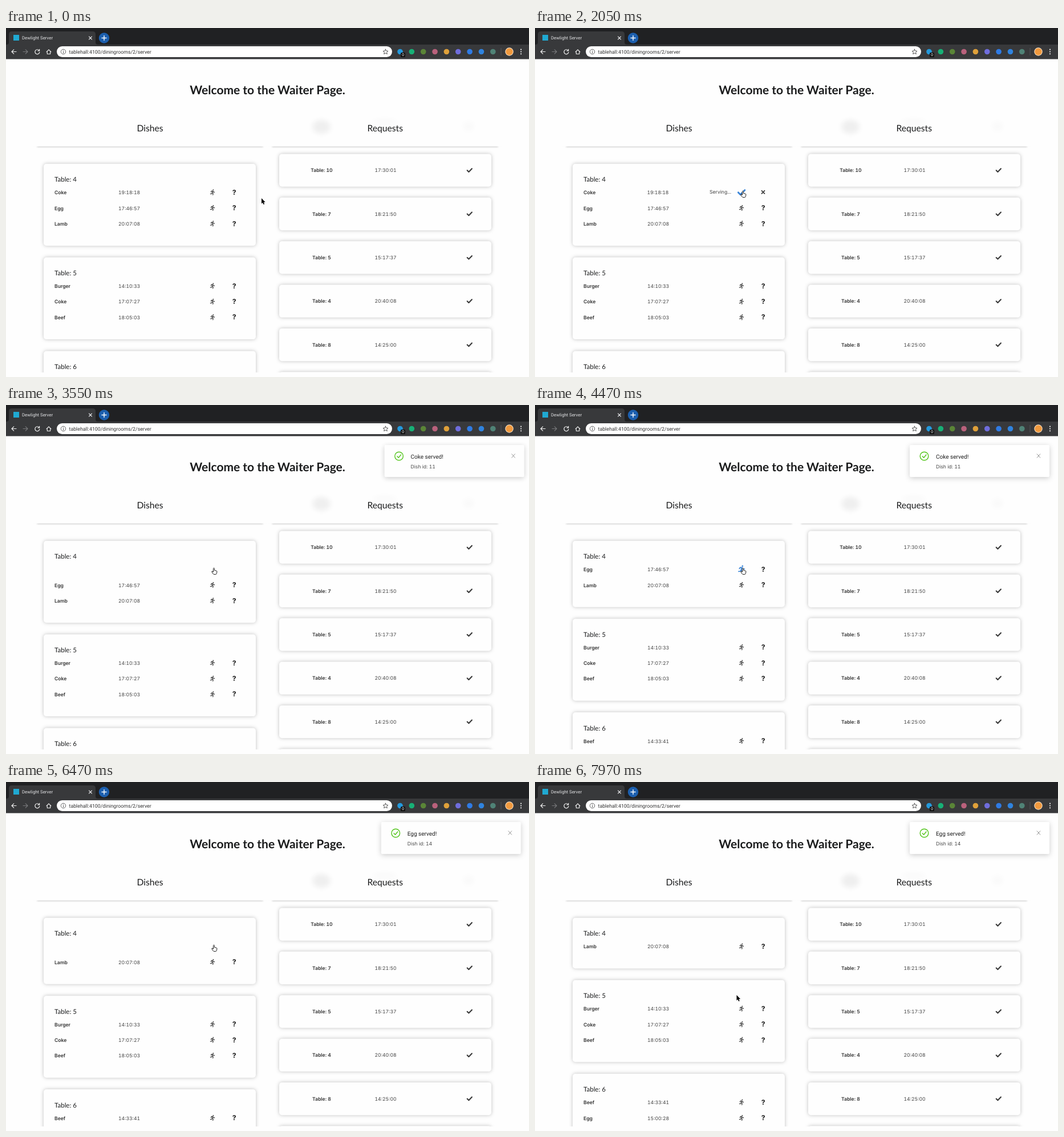
Animation, 917 px wide and 611 px high, one loop 8 s. Source, as an HTML page:

```html
<!DOCTYPE html>
<html lang="en">
<head>
<meta charset="utf-8">
<title>Waiter page</title>
<style>
  html, body { margin: 0; width: 100%; height: 100%; overflow: hidden; background: #fefefe; }
  svg { display: block; width: 917px; height: 611px; text-rendering: geometricPrecision; }
  text { font: 400 8.6px Inter, sans-serif; font-variant-numeric: tabular-nums; fill: #444; }
  .name { font-weight: 600; fill: #333; }
  .mark { font-weight: 800; font-size: 12px; fill: #333; text-anchor: middle; }
  .h1, .h2, .h3 { font-family: Lato, sans-serif; fill: #1b1c1d; }
  .h1 { font-size: 21px; font-weight: 700; text-anchor: middle; }
  .h2 { font-size: 15.7px; text-anchor: middle; }
  .h3 { font-size: 11.5px; }
  .chrome { font: 400 8.8px Roboto, sans-serif; fill: #333; }
  .tab { font-size: 7.8px; fill: #e2e3e5; }
  .note { font: 400 10px Roboto, sans-serif; fill: #1c1c1c; }
  .tip { font-size: 8.3px; fill: #fff; text-anchor: middle; }
  .mid { text-anchor: middle; }
  .card { fill: #fefefe; filter: drop-shadow(0 0 3px rgba(0,0,0,.25)); }
  .line { fill: none; stroke-linecap: round; stroke-linejoin: round; }
</style>
</head>
<body>
<script>
const LOOP = 8000, ROW = 27.4, DARK = [58, 58, 58], BLUE = [58, 133, 216];
const RUN = 'M.6-2L-.6 .9M.6-2L2-.2H3.6M.6-2L-1.6-2.2L-2.6-.6M-.6 .9L1.2 2L.7 4.6M-.6 .9L-1.4 2.6L-3.6 2.8';
const CHECK = 'M-4 .3L-1.3 3L4.2-2.7';
const CROSS = 'M-2.5-2.5L2.5 2.5M2.5-2.5L-2.5 2.5';

function el(parent, tag, attrs = {}) {
  const node = document.createElementNS('http://www.w3.org/2000/svg', tag);
  set(node, attrs);
  return parent.appendChild(node);
}
function set(node, attrs) {
  for (const key in attrs) node.setAttribute(key, attrs[key]);
}
const group = (p, x = 0, y = 0) => el(p, 'g', { transform: `translate(${x} ${y})` });
const rect = (p, x, y, width, height, fill, rx = 0) => el(p, 'rect', { x, y, width, height, fill, rx });
const circle = (p, cx, cy, r, fill) => el(p, 'circle', { cx, cy, r, fill });
const line = (p, d, stroke, width) => el(p, 'path', { d, stroke, 'stroke-width': width, class: 'line' });
function text(p, x, y, str, cls = '') {
  const node = el(p, 'text', { x, y, class: cls });
  node.textContent = str;
  return node;
}
const move = (node, x, y, s = 1) => node.setAttribute('transform', `translate(${x} ${y}) scale(${s})`);
const show = (node, on) => node.setAttribute('opacity', +on);

const clamp = v => Math.min(1, Math.max(0, v));
const span = (t, from, to) => clamp((t - from) / (to - from));
const easeOut = p => 1 - (1 - p) ** 3;
const easeBoth = p => p < .5 ? 4 * p ** 3 : 1 - 4 * (1 - p) ** 3;
const tint = p => `rgb(${DARK.map((c, i) => Math.round(c + (BLUE[i] - c) * p))})`;

const svg = el(document.body, 'svg', { viewBox: '0 0 917 611' });
const defs = el(svg, 'defs');
rect(el(defs, 'clipPath', { id: 'list' }), 0, 150, 917, 453);
for (const [id, size] of [['soft', 1.6], ['haze', 5]]) {
  const filter = el(defs, 'filter', { id, x: '-50%', y: '-300%', width: '200%', height: '700%' });
  el(filter, 'feGaussianBlur', { stdDeviation: size });
}

function browser() {
  rect(svg, 0, 0, 917, 30, '#202123');
  el(svg, 'path', { d: 'M1 29Q5 29 5 25V11Q5 6 10 6H152Q157 6 157 11V25Q157 29 161 29Z', fill: '#38393b' });
  rect(svg, 0, 29, 917, 25.5, '#38393b');
  rect(svg, 13, 12, 10, 10, '#20a9d2');
  text(svg, 28, 20.2, 'Dewlight Server', 'chrome tab');
  line(group(svg, 148, 17.5), CROSS, '#e2e3e5', 1.1);
  circle(svg, 172, 17.5, 9.2, '#1c5fae');
  line(svg, 'M168 17.5H176M172 13.5V21.5', '#fff', 1.4);

  line(svg, 'M18 41.5H10M13.7 37.8L10 41.5L13.7 45.2', '#f1f1f1', 1.2);
  line(svg, 'M30 41.5H38M34.3 37.8L38 41.5L34.3 45.2', '#77787a', 1.2);
  line(svg, 'M58 39.3A4 4 0 1 0 58.8 42.4M58.6 37.3V40H55.8', '#f1f1f1', 1.2);
  line(svg, 'M71 41.8L75 38L79 41.8M72.3 41.2V45.5H77.7V41.2', '#f1f1f1', 1.1);
  rect(svg, 89, 32, 588, 19, '#fff', 9.5);
  set(circle(svg, 100.5, 41.5, 4.2, 'none'), { stroke: '#555', 'stroke-width': .9 });
  line(svg, 'M100.5 41.2V43.6M100.5 39.4V39.5', '#555', 1);
  text(svg, 110.5, 44.7, 'tablehall:4100/diningrooms/2/server', 'chrome');
  line(svg, 'M665.5 37.2L666.8 40.1L670 40.4L667.6 42.5L668.3 45.6L665.5 44L662.7 45.6L663.4 42.5L661 40.4L664.2 40.1Z', '#444', .9);

  ['#2499dc', '#17b076', '#5a8537', '#b9617c', '#dfa03a', '#6f6ddc', '#2f7be4', '#2f83df', '#4f8276']
    .forEach((color, i) => circle(svg, 691 + i * 20.35, 41.5, 4.8, color));
  rect(svg, 692, 43, 8, 8, '#111', 1.5);
  set(text(svg, 696, 49.4, '0', 'mid'), { style: 'font-size:6.5px;fill:#fff' });
  rect(svg, 867.5, 35, 1, 13, '#55565a');
  circle(svg, 882.5, 41.5, 7.2, '#fbe9d2');
  circle(svg, 882.5, 41.5, 6.2, '#f0993e');
  for (const y of [37.7, 41.5, 45.3]) circle(svg, 903, y, 1.1, '#f1f1f1');
}

function header(x, title) {
  set(rect(svg, x + 4, 205, 396, 3, '#000'), { opacity: .3, filter: 'url(#soft)' });
  rect(svg, x - 4, 196, 412, 11.5, '#fefefe');
  text(svg, x + 202, 181, title, 'h2');
}

function dishRow(card, i, [name, time]) {
  const g = group(card, 0, 50.3 + i * ROW);
  const row = { g };
  text(g, 85, 3.1, name, 'name');
  row.time = text(g, 197, 3.1, time);
  row.ring = rect(g, 337, -14.5, 50, 29, 'none', 1.5);
  set(row.ring, { stroke: '#5a9cf0', 'stroke-width': 2.6, opacity: 0 });
  row.run = group(g, 362, -.5);
  row.legs = line(row.run, RUN, tint(0), 1.25);
  row.head = circle(row.run, 1.3, -3.9, 1, tint(0));
  row.ask = text(g, 400.3, 3.7, '?', 'mark');
  row.serving = group(g);
  text(row.serving, 306, 2.3, 'Serving...');
  row.check = group(row.serving, 362, -.5);
  row.tick = line(row.check, CHECK, tint(0), 2.1);
  line(group(row.serving, 400, -.7), CROSS, '#3a3a3a', 1.8);
  show(row.serving, false);
  return row;
}

function dishCard(list, top, table, dishes) {
  const g = group(list, 0, top);
  const box = rect(g, 66, 0, 372, 61.3 + 3 * ROW, '#fefefe', 5);
  box.setAttribute('class', 'card');
  text(g, 85, 31.5, 'Table: ' + table, 'h3');
  return { g, top, box, rows: dishes.map((d, i) => dishRow(g, i, d)) };
}

function notice(title, detail) {
  const g = group(svg);
  set(rect(g, 657, 70, 245, 56, '#fff', 2), { style: 'filter:drop-shadow(0 2.5px 5px rgba(0,0,0,.2))' });
  line(g, 'M689.8 89.5A7.3 7.3 0 1 1 675.2 89.5A7.3 7.3 0 1 1 689.8 89.5M679.3 89.8L681.7 92.2L686 87', '#52c41a', 1.4);
  text(g, 703, 93.6, title, 'note');
  text(g, 703, 111.2, detail);
  line(group(g, 883, 89), 'M-2.8-3.2L2.8 3.2M2.8-3.2L-2.8 3.2', '#888', .9);
  return g;
}

browser();
for (const [x, y, rx, ry, o] of [[553, 173, 16, 12, .06], [664, 164, 22, 6, .015], [811, 172, 10, 9, .015]])
  el(svg, 'ellipse', { cx: x, cy: y, rx, ry, opacity: o, filter: 'url(#haze)' });
text(svg, 458.5, 116, 'Welcome to the Waiter Page.', 'h1');
header(50.5, 'Dishes');
header(462.7, 'Requests');

const list = el(svg, 'g', { 'clip-path': 'url(#list)' });
const cards = [
  [4, [['Coke', '19:18:18'], ['Egg', '17:46:57'], ['Lamb', '20:07:08']]],
  [5, [['Burger', '14:10:33'], ['Coke', '17:07:27'], ['Beef', '18:05:03']]],
  [6, [['Beef', '14:33:41'], ['Egg', '15:00:28']]]
].map(([table, dishes], i) => dishCard(list, 237.7 + i * 163.9, table, dishes));

[[10, '17:30:01'], [7, '18:21:50'], [5, '15:17:37'], [4, '20:40:08'], [8, '14:25:00'], [9, '16:12:45']]
  .forEach(([table, time], i) => {
    const g = group(list, 0, 220.5 + i * 76.35);
    rect(g, 479, 0, 372, 57.3, '#fefefe', 5).setAttribute('class', 'card');
    text(g, 553.4, 31.8, 'Table: ' + table, 'name mid');
    text(g, 646.5, 31.8, time);
    line(group(g, 812.7, 28.4), CHECK, '#3a3a3a', 2.1);
  });

const coke = notice('Coke served!', 'Dish id: 11');
const egg = notice('Egg served!', 'Dish id: 14');

const tip = group(svg);
rect(tip, 342.5, 243.5, 39, 23.5, '#363636', 2);
el(tip, 'path', { d: 'M358.6 266.8H365.4L362 270.2Z', fill: '#363636' });
text(tip, 362, 258.4, 'serving', 'tip');

const arrow = el(svg, 'path', {
  d: 'M0 0V9.6L2.1 7.7L3.6 11L5.2 10.3L3.8 7.1H6.6Z', stroke: '#fff', 'stroke-width': .8, 'paint-order': 'stroke'
});
const hand = el(svg, 'path', {
  d: 'M-1 1.2C-1-.3 1-.3 1 1.2V4.2L4 4.8Q5.6 5.2 5.4 6.6L4.9 9.2Q4.6 11 3.2 11.2H0Q-1 11-1.8 9.6L-3.6 6.8Q-4 5.6-2.6 5.8L-1 7Z',
  fill: '#fff', stroke: '#111', 'stroke-width': .95
});

// When each dish of the first table is hovered, clicked, confirmed and removed.
const steps = [
  { hover: 480, click: 1540, check: 1900, leave: 3130, gone: 3600 },
  { hover: 3700, click: 4760, check: 5500, leave: 6015, gone: 6500 },
  { hover: 6900, out: 7480, click: LOOP, check: LOOP, leave: LOOP, gone: LOOP }
];

function drawRow(row, s, i, gone, t) {
  const out = easeOut(span(t, s.leave, s.leave + 470));
  const serving = t >= s.click;
  move(row.g, -20 * out, 50.3 + (i - gone) * ROW);
  show(row.g, 1);
  row.g.setAttribute('opacity', t >= s.gone ? 0 : 1 - out);
  row.time.setAttribute('x', serving ? 196.4 : 197);
  show(row.serving, serving);
  show(row.run, !serving);
  show(row.ask, !serving);
  show(row.ring, t >= s.leave);
  const h = span(t, s.hover, s.hover + 120) * (s.out ? 1 - span(t, s.out, s.out + 120) : 1);
  move(row.run, 362, -.5, 1 + .4 * h);
  row.legs.setAttribute('stroke', tint(h));
  row.head.setAttribute('fill', tint(h));
  const c = span(t, s.check, s.check + 120);
  move(row.check, 362, -.5, 1 + .4 * c);
  row.tick.setAttribute('stroke', tint(c));
}

function slideIn(node, t, from, until = LOOP) {
  const p = easeBoth(span(t, from, from + 260));
  move(node, 245 * (1 - p), 0);
  node.setAttribute('opacity', p * (1 - span(t, until, until + 150)));
}

function render(t) {
  const gone = steps.filter(s => t >= s.gone).length;
  cards[0].rows.forEach((row, i) => drawRow(row, steps[i], i, gone, t));
  cards[0].box.setAttribute('height', 61.3 + (3 - gone) * ROW);
  for (const card of cards.slice(1)) move(card.g, 0, card.top - gone * ROW);

  slideIn(coke, t, 3340, 6050);
  slideIn(egg, t, 6235);
  tip.setAttribute('opacity', span(t, 700, 800) * (1 - span(t, 1550, 1650)));

  const a = easeBoth(span(t, 50, 680)), b = easeBoth(span(t, 7340, 7900));
  const x = 448 - 83.5 * a - 11 * b, y = 298 - 12.7 * a + 87.7 * b;
  const pointing = t >= 480 && t < 7500;
  move(hand, x, y);
  move(arrow, x, y);
  show(hand, pointing);
  show(arrow, !pointing);
}

const start = performance.now();
function frame() {
  render((performance.now() - start) % LOOP);
  requestAnimationFrame(frame);
}
frame();
</script>
</body>
</html>
```
